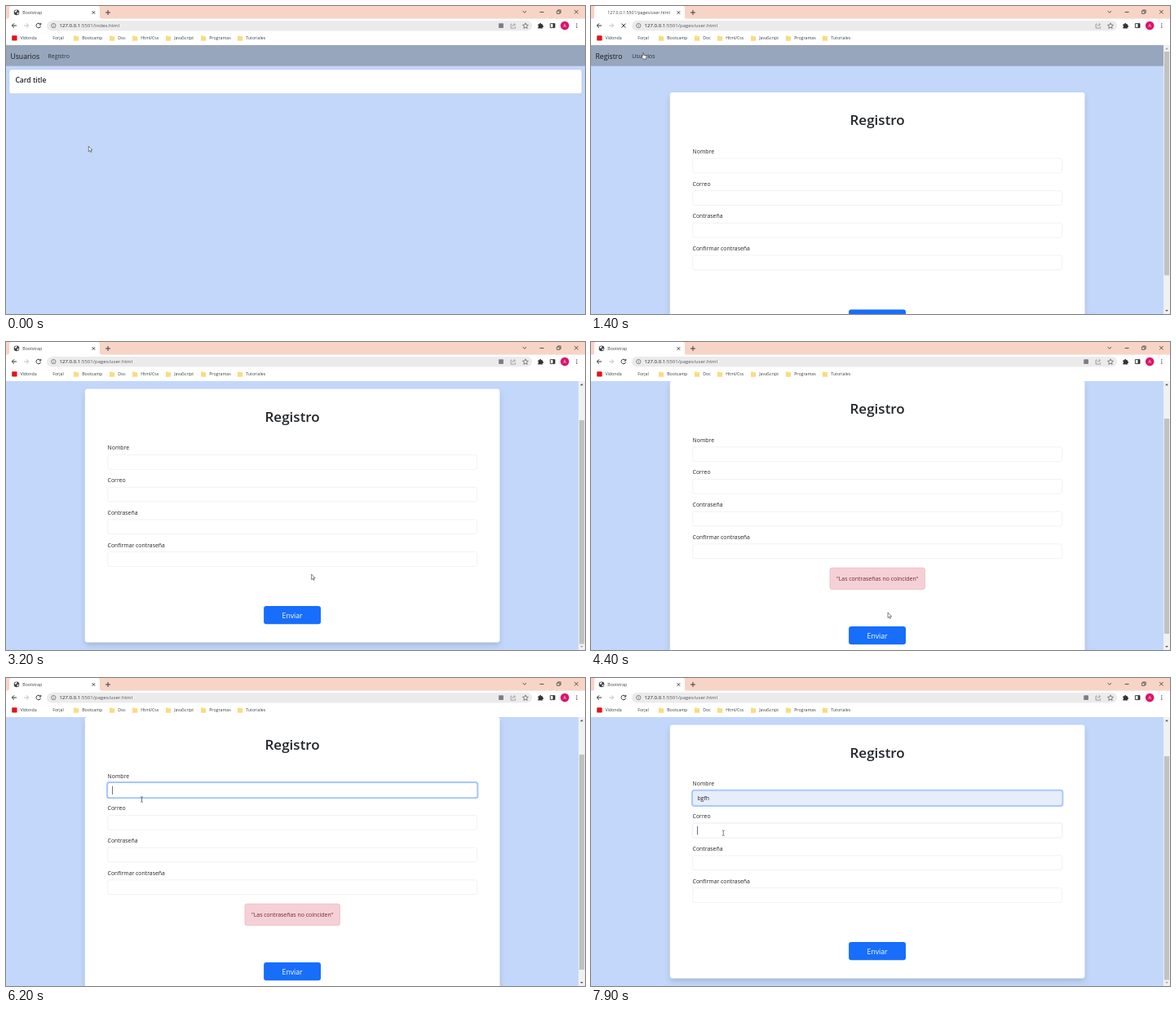
An HTML page that plays this animation: 710 px wide and 378 px high, repeating every 8000 ms.

```html
<!DOCTYPE html>
<html lang="es">
<head>
<meta charset="utf-8">
<title>Registro</title>
<style>
  html, body { margin: 0; width: 100%; height: 100%; overflow: hidden; background: #c3d7fb; }
  svg { display: block; width: 100%; height: 100%; }
  text { font-family: "Open Sans", "Noto Sans", sans-serif; white-space: pre; }
</style>
</head>
<body>
<svg id="stage" viewBox="0 0 710 378"></svg>
<script>
const LOOP = 8000;
const OPEN = 1400, LOADED = 1500;           // page change
const SHOW = 4400, HIDE = 6600;             // alert
const FOCUS = 5800, FILL = 7000, NEXT = 7880; // form fields
const MAX_SCROLL = 48.5, ALERT_SHIFT = -9.7, ALERT_ROOM = 34.6;

const rect = (x, y, w, h, fill, r = 0, more = "") =>
  `<rect x="${x}" y="${y}" width="${w}" height="${h}" rx="${r}" fill="${fill}" ${more}/>`;
const text = (x, y, size, str, fill = "#212529", more = "") =>
  `<text x="${x}" y="${y}" font-size="${size}" fill="${fill}" ${more}>${str}</text>`;
const line = (d, stroke = "#3c4043", w = 0.9, more = "") =>
  `<path d="${d}" fill="none" stroke="${stroke}" stroke-width="${w}" ${more}/>`;
const circle = (x, y, r, fill, more = "") =>
  `<circle cx="${x}" cy="${y}" r="${r}" fill="${fill}" ${more}/>`;
const group = (id, body, more = "") => `<g id="${id}" ${more}>${body}</g>`;
const MID = 'text-anchor="middle"', SEMIBOLD = 'font-weight="600"';

function navbar(brand, link, linkX, width) {
  return rect(0, 48, width, 25.7, "#97a6bc") +
    text(5.4, 64.6, 8.7, brand, "#16191d") +
    text(linkX, 63.9, 6.9, link, "#2c333c");
}

function homePage() {
  return navbar("Usuarios", "Registro", 51.6, 710) +
    rect(4, 78, 702, 29.6, "#fff", 2.4, 'stroke="#b9c7e0" stroke-width=".5"') +
    text(11.4, 94.4, 8.6, "Card title", "#212529", SEMIBOLD);
}

const fieldY = i => 187 + i * 39.7;

function field(label, i) {
  return text(124.6, fieldY(i) - 6.1, 6.9, label) +
    rect(124.7, fieldY(i), 453, 17.8, "#fff", 2.2,
      `id="field${i}" stroke="#e6e9ed" stroke-width=".6"`) +
    rect(124, fieldY(i) - 0.7, 454.4, 19.2, "none", 2.8,
      `id="ring${i}" stroke="#a6c6fc" stroke-width="2" opacity="0"`);
}

function formPage() {
  const labels = ["Nombre", "Correo", "Contraseña", "Confirmar contraseña"];
  const alert = rect(293, 335.4, 116.4, 26.4, "#f5d0d7", 2.4, 'stroke="#e6aab6" stroke-width=".6"') +
    text(351.2, 351.3, 6.95, '"Las contraseñas no coinciden"', "#6a2a33", MID);
  const button = rect(316.1, 372.5, 69.9, 22.3, "#176efb", 3, 'id="button"') +
    text(351.1, 387.2, 8.7, "Enviar", "#fff", MID);
  const card = rect(96.9, 106, 508.5, 311, "#fff", 3, 'id="card" filter="url(#shadow)"') +
    text(351.1, 146.2, 17, "Registro", "#212529", MID + " " + SEMIBOLD) +
    labels.map(field).join("") +
    text(130.4, 198.5, 6.9, "bgfh", "#212529", 'id="typed"') +
    rect(130.1, 0, 0.7, 10.4, "#333", 0, 'id="caret"') +
    group("alert", alert) + group("send", button);
  return group("scroller", navbar("Registro", "Usuarios", 50.2, 702) + group("content", card)) +
    rect(702, 48, 8, 330, "#f1f1f1") +
    rect(702.9, 56, 6.2, 274.5, "#c1c1c1", 0, 'id="thumb"') +
    '<path id="up" d="M704.2 53.2h3.6l-1.8-2.2z"/><path id="down" d="M704.2 372.9h3.6l-1.8 2.2z"/>';
}

function tabStrip() {
  const globe = circle(13, 7.9, 3.3, "#3c4043") +
    '<path d="M10.6 6.5l2-1.6 1.2 1.1-1.4 1.6-1.2.3zM13.5 8.3l2-.5-.4 1.9-1.3.7z" fill="#fff"/>';
  return rect(0, 0, 710, 16, "#f7d4c6") +
    '<path d="M1 16q3 0 3-3V3q0-3 3-3h105q3 0 3 3v10q0 3 3 3z" fill="#fff"/>' +
    group("favicon", globe) +
    text(20.3, 9.8, 5.2, "Bootstrap", "#3c4043", 'id="tab"') +
    line("M105.6 6.2l3.6 3.6m0-3.6l-3.6 3.6M122 8h6m-3-3v6", "#333") +
    line("M633.6 6.2l2.2 2 2.2-2M654.6 7.5h5M697.1 4.9l4.6 4.6m0-4.6l-4.6 4.6", "#333", 0.8) +
    line("M675.6 6h3.4v3.4h-3.4zM676.7 6V4.9h3.5v3.5h-1.2", "#333", 0.7);
}

function toolbar() {
  const star = "M637 20.9l1 2.2 2.4.3-1.8 1.6.5 2.4-2.1-1.2-2.1 1.2.5-2.4-1.8-1.6 2.4-.3z";
  return rect(0, 15.6, 710, 32.4, "#fff") +
    line("M13 24H7.4m2.6-2.7L7.3 24l2.7 2.7", "#333", 1) +
    line("M22 24h5.6M25 21.3l2.7 2.7-2.7 2.7", "#bdc1c6", 1) +
    group("reload", line("M42.2 22.4a2.8 2.8 0 1 0 .4 2.3M42.8 20.8v2.2h-2.2", "#333", 1)) +
    group("stop", line("M37.4 21.6l5 5m0-5l-5 5", "#333", 1)) +
    rect(50, 18, 595, 12.4, "#ebebec", 6.2) +
    circle(58.3, 24.1, 2.7, "none", 'stroke="#5f6368" stroke-width=".7"') +
    line("M58.3 23.7v1.9M58.3 22.4v.7", "#5f6368", 0.7) +
    `<text x="65.6" y="26.3" font-size="6.07" fill="#202124">127.0.0.1<tspan id="path" fill="#54585d"></tspan></text>` +
    rect(604.2, 21.2, 5.8, 5.8, "#7b7f85", 0.8, 'id="translate"') +
    line("M620.6 22.2h-1.6v5h5.6v-2M620.7 25.2q.2-2.4 3.4-2.5M622.8 21l1.8 1.7-1.8 1.7", "#80868b", 0.7) +
    line(star, "#4d5156", 0.7) +
    '<path d="M652.4 22.2h1.7a1.1 1.1 0 0 1 2.2 0h1.7v1.6a1.1 1.1 0 0 1 0 2.2v1.5h-5.6v-1.6a1.1 1.1 0 0 0 0-2z" fill="#333"/>' +
    line("M667.4 21.6h5.6v5h-5.6z", "#333", 0.9) + rect(670.6, 21.6, 2.4, 5, "#333") +
    circle(685.2, 24.1, 5.3, "#d9176a") + text(685.2, 26.1, 5.4, "A", "#fff", MID) +
    [21.9, 24.1, 26.3].map(y => circle(699.8, y, 0.7, "#333")).join("");
}

function bookmarks() {
  const folders = [[83, "Bootcamp"], [127, "Doc"], [155, "Html/Css"],
    [196, "JavaScript"], [239, "Programas"], [284, "Tutoriales"]];
  const label = (x, str) => text(x, 41.3, 5.25, str, "#3c4043");
  return rect(7.2, 36.2, 6.4, 6.4, "#e3141b", 0.8) +
    label(17.4, "Vidonda") + label(57.2, "Forjal") +
    folders.map(([x, str]) =>
      `<path d="M${x} 36.4h2.6l.7.8h2.9v5.6h-6.2z" fill="#f8dc84"/>` + label(x + 10.2, str)).join("");
}

function pointers() {
  const arrow = '<path d="M0 0v6.6l1.5-1.4 1 2.3 1.1-.5-1-2.2h2z" fill="#fff" stroke="#222" stroke-width=".55"/>';
  const hand = '<path d="M-.7 .5q.7-.9 1.3 0V3l2.8.6q.8.3.6 1.2L3.5 7.8H.1L-2 5q0-.9 1.3-.2z" fill="#fff" stroke="#222" stroke-width=".55"/>';
  const beam = line("M-1.4-3.1h1l.4.4.4-.4h1M0-2.7v5.4M-1.4 3.1h1l.4-.4.4.4h1", "#333", 0.65);
  return group("pointer", group("arrow", arrow) + group("hand", hand) + group("beam", beam));
}

const stage = document.getElementById("stage");
stage.innerHTML =
  `<defs><filter id="shadow" x="-5%" y="-8%" width="110%" height="118%">
    <feDropShadow dx="0" dy="3.6" stdDeviation="3.6" flood-color="#000" flood-opacity=".15"/>
  </filter></defs>` +
  rect(0, 0, 710, 378, "#c3d7fb") +
  group("home", homePage()) + group("form", formPage()) +
  tabStrip() + toolbar() + bookmarks() + pointers();

const el = {};
stage.querySelectorAll("[id]").forEach(node => { el[node.id] = node; });

const clamp = v => Math.min(1, Math.max(0, v));
const smooth = p => p * p * (3 - 2 * p);
const between = (t, a, b) => t >= a && t < b;
const set = (node, name, value) => node.setAttribute(name, value);
const show = (node, on) => set(node, "display", on ? "inline" : "none");

// time, x, y of the pointer's hot spot
const route = [
  [60, 101.3, 172], [880, 64, 57.2], [1400, 64, 57.2], [2080, 365, 222.2],
  [2960, 365, 222.2], [3200, 374.6, 285], [3800, 365.5, 333], [3980, 364, 332],
  [4480, 364, 332], [4900, 425.2, 325], [5230, 158.5, 176], [5580, 162.5, 145],
  [5800, 162.5, 145], [6180, 166.5, 149], [6680, 166.5, 149], [7400, 164, 166],
  [7850, 162.3, 190.2]
];
const kinds = [[0, "arrow"], [800, "hand"], [1480, "arrow"], [3650, "hand"],
  [4400, "arrow"], [5180, "beam"]];

function pointerAt(t) {
  const i = route.findIndex(k => k[0] > t);
  if (i === 0) return route[0].slice(1);
  if (i < 0) return route[route.length - 1].slice(1);
  const [t0, x0, y0] = route[i - 1], [t1, x1, y1] = route[i];
  const p = smooth((t - t0) / (t1 - t0));
  return [x0 + (x1 - x0) * p, y0 + (y1 - y0) * p];
}

function drawBrowser(t) {
  const loading = between(t, OPEN, LOADED);
  const path = t < OPEN ? ":5501/index.html" : ":5501/pages/user.html";
  el.path.textContent = path;
  el.tab.textContent = loading ? "127.0.0.1" + path : "Bootstrap";
  show(el.favicon, !loading);
  show(el.translate, !loading);
  show(el.reload, !loading);
  show(el.stop, loading);
}

function drawForm(t) {
  const scroll = MAX_SCROLL * (1 - (1 - clamp((t - 2240) / 360)) ** 4);
  const alert = between(t, SHOW, HIDE);
  set(el.scroller, "transform", `translate(0 ${-scroll})`);
  set(el.content, "transform", `translate(0 ${alert ? ALERT_SHIFT : 0})`);
  set(el.card, "height", 311 + (alert ? ALERT_ROOM : 0));
  set(el.send, "transform", `translate(0 ${alert ? ALERT_ROOM : 0})`);
  show(el.alert, alert);
  set(el.thumb, "y", alert ? 94 : 56 + scroll * 0.825);
  set(el.thumb, "height", alert ? 264 : 274.5);
  set(el.up, "fill", scroll > 0 ? "#505050" : "#a3a3a3");
  set(el.down, "fill", alert || scroll < MAX_SCROLL ? "#505050" : "#a3a3a3");
  set(el.button, "fill", between(t, 3650, SHOW) ? "#0b5ed7" : "#176efb");

  const next = clamp((t - NEXT) / 150);
  set(el.ring0, "opacity", smooth(clamp((t - FOCUS) / 150)) * (1 - smooth(next)));
  set(el.ring1, "opacity", smooth(next));
  set(el.field0, "fill", t >= FILL ? "#e6edfb" : "#fff");
  show(el.typed, t >= FILL);

  const second = t >= NEXT;
  const since = t - (second ? NEXT : FOCUS);
  show(el.caret, since >= 0 && since % 1000 < 500);
  set(el.caret, "x", !second && t >= FILL ? 146.2 : 130.1);
  set(el.caret, "y", fieldY(second ? 1 : 0) + 3.8);
}

function drawPointer(t) {
  const [x, y] = pointerAt(t);
  const kind = kinds.filter(k => k[0] <= t).pop()[1];
  set(el.pointer, "transform", `translate(${x} ${y})`);
  ["arrow", "hand", "beam"].forEach(name => show(el[name], name === kind));
}

function draw(t) {
  show(el.home, t < OPEN);
  show(el.form, t >= OPEN);
  drawBrowser(t);
  drawForm(t);
  drawPointer(t);
}

const start = performance.now();
function tick() {
  draw((performance.now() - start) % LOOP);
  requestAnimationFrame(tick);
}
tick();
</script>
</body>
</html>
```
